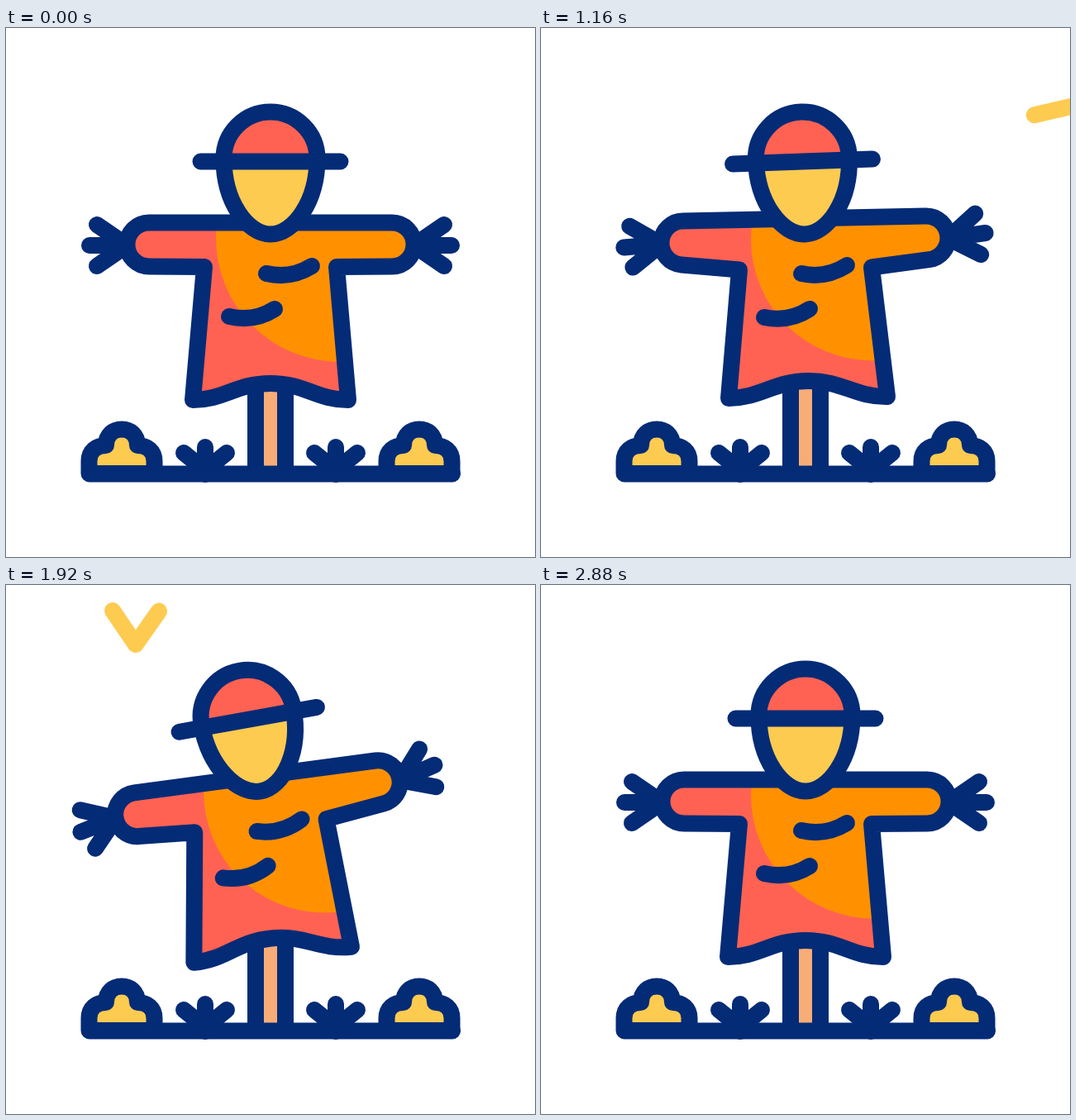
Write an HTML page with a canvas that moves like this. It is 640x640 px and loops after 3000 ms.

```html
<!DOCTYPE html>
<html lang="en">
<head>
<meta charset="utf-8">
<title>Scarecrow in the wind</title>
<style>
  html, body { margin: 0; width: 100%; height: 100%; overflow: hidden; background: #fff; }
  canvas { display: block; }
</style>
</head>
<body>
<canvas id="stage" width="640" height="640"></canvas>
<script>
const ctx = document.getElementById('stage').getContext('2d');
const NAVY = '#042b76', RED = '#ff6252', ORANGE = '#ff9100', YELLOW = '#fdcb50', TAN = '#f8ad77';
const LOOP = 3000, STEP = 40, ARM_R = 26.5;
const { sin, cos, PI } = Math;

// Each row: time, then angles in degrees (positive = to the left), then the cloth lift 0..1.
// time, lean, head, arms, waist shift, waist tilt, hem, left hand, right hand, lift
const POSES = [
  [220, 0, 0, 0, 0, 0, 0, 0, 0, 0],
  [400, 2.85, 3.75, 2.9, 2.5, 2.6, 3, 6.7, 5.5, 0],
  [820, 12.5, 23, 14, 9.4, 11.7, 11.5, 33, 35.5, 1],
  [1160, .63, 2, 1.2, 0, 1.05, .6, 4.8, 8, 1],
  [1400, -6.5, -13, -6.5, -4.5, -5, -6, -19, -18, .8],
  [1640, -3.56, -10.2, -3.3, -1.4, -1.06, -2.6, -13.8, -8, .7],
  [1960, 5.5, 11, 8, 4.5, 6, 6, 23, 25, .9],
  [2200, 1.85, 5.1, 4.3, .9, 2.5, 2.66, 18, 22, .9],
  [2460, -3, -5, -2.5, -2.5, -2.5, -3, -6, -6, .5],
  [2880, 0, 0, 0, 0, 0, 0, 0, 0, 0]
];

const slope = (i, k) => (POSES[i + 1][k] - POSES[i][k]) / (POSES[i + 1][0] - POSES[i][0]);

// Tangent that is flat at every turning point.
function tangent(i, k) {
  if (i === 0 || i === POSES.length - 1) return 0;
  const a = slope(i - 1, k), b = slope(i, k);
  return a * b > 0 ? 2 * a * b / (a + b) : 0;
}

function poseAt(time) {
  const t = Math.min(Math.max(time, POSES[0][0]), POSES[POSES.length - 1][0]);
  let i = 0;
  while (i < POSES.length - 2 && t >= POSES[i + 1][0]) i++;
  const span = POSES[i + 1][0] - POSES[i][0];
  const u = (t - POSES[i][0]) / span, v = 1 - u;
  return POSES[i].slice(1).map((from, n) => {
    const k = n + 1;
    return from * v * v * (1 + 2 * u) + POSES[i + 1][k] * u * u * (3 - 2 * u)
      + span * u * v * (v * tangent(i, k) - u * tangent(i + 1, k));
  });
}

function stroke(path, color = NAVY) {
  ctx.strokeStyle = color;
  ctx.stroke(path instanceof Path2D ? path : new Path2D(path));
}

function fill(path, color) {
  ctx.fillStyle = color;
  ctx.fill(path instanceof Path2D ? path : new Path2D(path));
}

function at(x, y, angle, draw) {
  ctx.save();
  ctx.translate(x, y);
  ctx.rotate(angle);
  draw();
  ctx.restore();
}

function drawGround() {
  fill('M302 432H338V540H302Z', TAN);
  ctx.lineCap = 'butt';
  stroke('M302 432V540M338 432V540');
  ctx.lineCap = 'round';
  for (const x of [140, 500]) at(x, 0, 0, () => {
    const mound = 'M-39.5 539V524C-39.5 512 -31 505 -19 505C-19 492 -10 485.5 0 485.5'
      + 'C10 485.5 19 492 19 505C31 505 39.5 512 39.5 524V539Z';
    fill(mound, YELLOW);
    stroke(mound);
  });
  for (const x of [241, 399]) at(x, 0, 0, () => stroke('M0 507V540M-26 514L0 535L26 514'));
  stroke('M101 539.5H540');
}

function drawBird(time) {
  const s = time - 1640;
  const phase = 2 * PI * s / 560;
  const x = 321 - .6162 * s + .0001052 * s * s;
  const y = 57 + .0044 * s + .000174 * s * s;
  const reach = 28 + 22 * Math.abs(sin(phase));
  const drop = -13.5 + 27 * cos(phase);
  at(x, y, -(3 - s * .0125) * PI / 180, () =>
    stroke(`M${-reach} ${drop}L0 0L${reach} ${drop}`, YELLOW));
}

function drawScarecrow(pose) {
  const lift = pose[8];
  const [lean, head, arms, shift, waist, hem, handL, handR] = pose.map(a => a * PI / 180);

  // Places a point given relative to the foot of the shirt.
  const place = (x, y, push, tilt, dy) =>
    [320 + x * cos(tilt) + y * sin(push), 450 - x * sin(tilt) + y * cos(push) + dy];
  const arm = side => place(side * 147, -188, (lean + shift) / 2, arms, -5 * lift);
  const corner = side => place(side * 80, -161, shift, waist, 2 * lift);
  const hemPoint = (x, y) => {
    const [px, py] = place(x, y, hem, hem, -3 * lift);
    return [px + 3 * lift, py];
  };
  const underArm = (side, a, c) => {
    const dx = c[0] - a[0], dy = c[1] - a[1];
    return Math.atan2(dy, dx) - side * Math.acos(ARM_R / Math.hypot(dx, dy));
  };

  const armL = arm(-1), armR = arm(1), cornerL = corner(-1), cornerR = corner(1);
  const top = -PI / 2 - arms, half = 94 + 2 * lift;

  const hand = (side, [x, y], angle) =>
    at(x + side * ARM_R * cos(arms), y - side * ARM_R * sin(arms), -angle, () => {
      ctx.scale(side, 1);
      stroke('M0 1H45.5M36.5 -24L0 1L36.5 26');
    });
  hand(-1, armL, handL);
  hand(1, armR, handR);

  const shirt = new Path2D();
  shirt.arc(...armR, ARM_R, top, underArm(1, armR, cornerR));
  shirt.lineTo(...cornerR);
  shirt.lineTo(...hemPoint(half, 0));
  shirt.bezierCurveTo(...hemPoint(56, 0), ...hemPoint(42, -20), ...hemPoint(0, -20));
  shirt.bezierCurveTo(...hemPoint(-42, -20), ...hemPoint(-56, 0), ...hemPoint(-half, 0));
  shirt.lineTo(...cornerL);
  shirt.arc(...armL, ARM_R, underArm(-1, armL, cornerL), top);
  shirt.closePath();

  fill(shirt, RED);
  ctx.save();
  ctx.clip(shirt);
  ctx.translate(320, 450);
  ctx.transform(cos(waist), -sin(waist), sin(shift), cos(shift), 0, 0);
  ctx.translate(-320, -450);
  const patch = new Path2D();
  patch.arc(404, 254, 150, 0, 2 * PI);
  fill(patch, ORANGE);
  stroke('M315 297Q344 304 370 288M270 349Q300 356 325 340');
  ctx.restore();
  stroke(shirt);

  at(320 - 275 * sin(lean), 450 - 275 * cos(lean), -head, () => {
    ctx.translate(-320, -175);
    const dome = 'M263.5 158A56.5 56.5 0 0 1 376.5 158';
    const face = 'C376.5 210 348 249.5 320 249.5C292 249.5 263.5 210 263.5 158';
    fill(dome + 'V162H263.5Z', RED);
    fill('M263.5 158H376.5' + face + 'Z', YELLOW);
    stroke(dome + face + 'Z');
    stroke('M235.5 161.5H404.5');
  });
}

function frame(now) {
  const time = Math.floor(now % LOOP / STEP) * STEP;
  ctx.fillStyle = '#fff';
  ctx.fillRect(0, 0, 640, 640);
  ctx.lineWidth = 20;
  ctx.lineCap = ctx.lineJoin = 'round';
  drawBird(time);
  drawGround();
  drawScarecrow(poseAt(time));
  requestAnimationFrame(frame);
}
requestAnimationFrame(frame);
</script>
</body>
</html>
```
